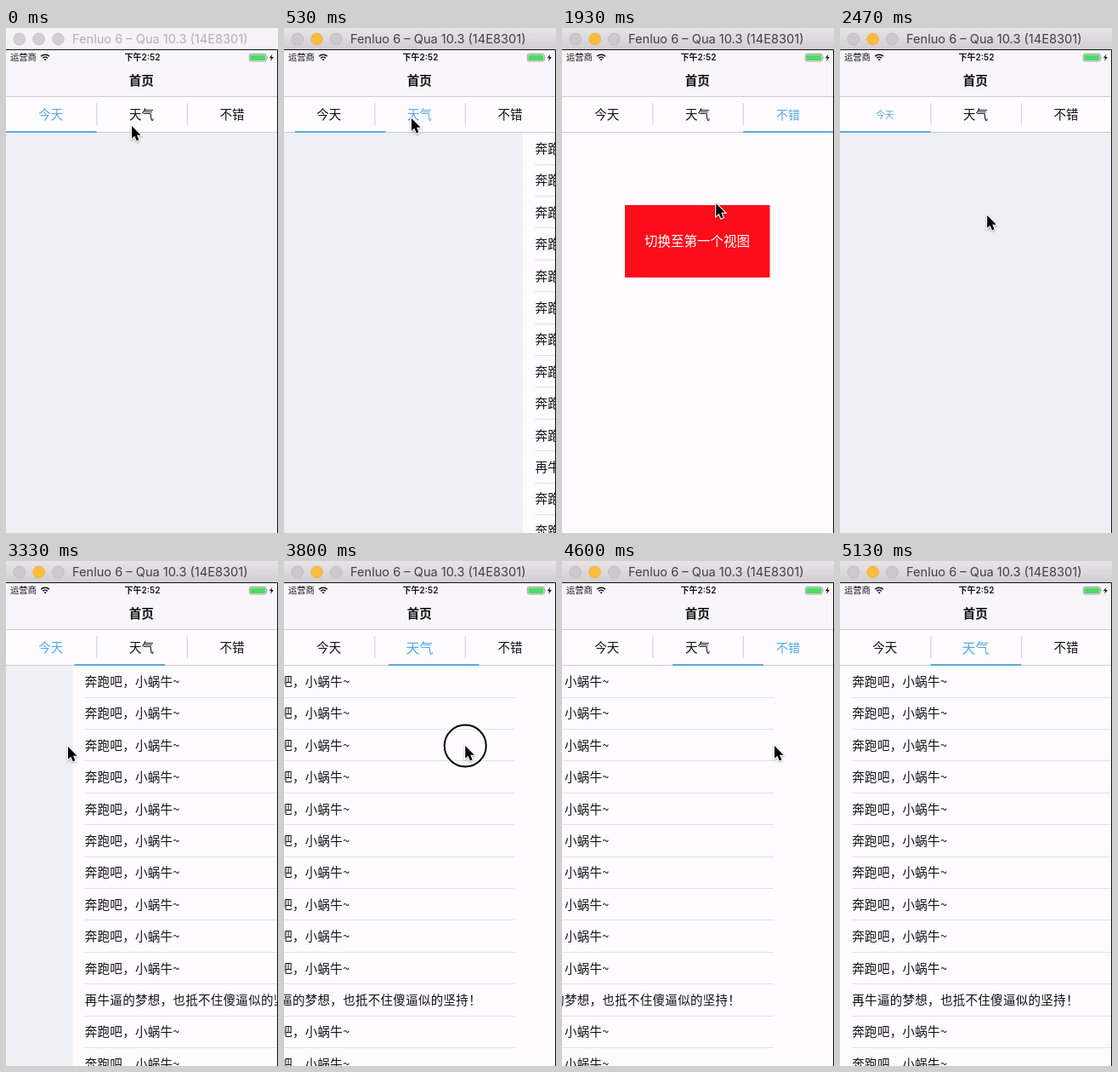
An HTML page for the animation above (5190 ms loop, 320 px wide and 593 px high).

```html
<!DOCTYPE html>
<html lang="zh-CN">
<head>
<meta charset="utf-8">
<title>首页</title>
<style>
  html, body { margin: 0; width: 100%; height: 100%; overflow: hidden; }
  svg { display: block; width: 320px; height: 593px; }
  text { font: 14.5px "Noto Sans CJK SC", "Noto Sans CJK", sans-serif; fill: #111; }
  .mid { text-anchor: middle; }
  .title { font: 14.6px Inter, Roboto, sans-serif; fill: #b2b0b2; }
  .active .title { fill: #404040; }
  .light { fill: #d3d0d3; stroke: #c2bfc2; stroke-width: .8; }
  .active .light { fill: #cbc9cb; stroke: #b9b7b9; }
  .active .min { fill: #fdbc40; stroke: #eab045; }
  #bar { fill: #f6f3f6; }
  .active #bar { fill: url(#chrome); }
  .status { font-size: 10.3px; }
  .time { font: 600 10px Inter, "Noto Sans CJK SC", sans-serif; }
  .nav { font-weight: 700; }
  .tab.on { fill: #55a8e5; }
  .row { letter-spacing: .3px; }
  .action { font-size: 15.5px; fill: #fff; }
  .rule { fill: #e1e0e4; }
  .edge { fill: #cbcacd; }
  .arrow { filter: drop-shadow(0 1px 1px #0005); }
</style>
</head>
<body>
<svg id="stage" viewBox="0 0 320 593">
  <defs>
    <linearGradient id="chrome" x2="0" y2="1">
      <stop stop-color="#e8e5e8"/><stop offset="1" stop-color="#d1ced1"/>
    </linearGradient>
  </defs>

  <rect width="320" height="593" fill="#eff0f6"/>
  <g id="pages">
    <rect x="320" y="122" width="640" height="471" fill="#fefcff"/>
    <g id="rows"></g>
    <rect x="714" y="208" width="170.5" height="85" fill="#fc0d1b"/>
    <text class="action mid" x="799" y="256">切换至第一个视图</text>
  </g>

  <rect y="25" width="320" height="55" fill="#f8f6fa"/>
  <text class="status" x="5" y="38.3">运营商</text>
  <path d="M41.2 33.2a7 7 0 0 1 9.8 0M43.3 35.4a4 4 0 0 1 5.6 0" fill="none" stroke="#111" stroke-width="1.5"/>
  <path d="M46.1 38.6l-1.5-1.7a2.2 2.2 0 0 1 3 0z" fill="#111"/>
  <text class="time mid" x="160.5" y="38.2">下午2:52</text>
  <rect x="286.3" y="30.5" width="20" height="8.5" rx="1.8" fill="none" stroke="#8b8a8e" stroke-width=".8"/>
  <rect x="287.3" y="31.5" width="18" height="6.5" rx=".9" fill="#4cd964"/>
  <path d="M307 33.2q1.2 1.5 0 3z" fill="#8b8a8e"/>
  <path d="M313.4 30.4l-3.6 4.9h2.3l-1 3.7 3.7-5h-2.4z" fill="#111"/>
  <text class="nav mid" x="159.2" y="67.3">首页</text>

  <rect y="80" width="320" height="43" fill="#fefcff"/>
  <rect class="edge" y="80" width="320" height="1"/>
  <rect class="edge" y="122" width="320" height="1"/>
  <rect class="edge" x="106.4" y="88" width="1" height="26"/>
  <rect class="edge" x="212.8" y="88" width="1" height="26"/>
  <g id="tabs"></g>
  <rect id="underline" y="121" width="106.6" height="2" fill="#5baae4"/>

  <rect id="bar" width="320" height="25"/>
  <circle class="light" cx="15.8" cy="13" r="6.9"/>
  <circle class="light min" cx="38.6" cy="13" r="6.9"/>
  <circle class="light" cx="61.4" cy="13" r="6.9"/>
  <text class="title" x="78" y="18.3">Fenluo 6 – Qua 10.3 (14E8301)</text>
  <path d="M0 25.5H319.5V593" fill="none" stroke="#111"/>

  <g id="cursor">
    <g id="ring" fill="none">
      <circle r="24.5" stroke="#fff" stroke-width="3.4"/>
      <circle r="24.5" stroke="#000" stroke-width="2"/>
    </g>
    <path class="arrow" d="M0 0V14.8L3.4 11.7 5.8 17.4 8.4 16.3 6 10.7H10.6Z"
          stroke="#fff" stroke-width="2.2" paint-order="stroke"/>
  </g>
</svg>

<script>
const LOOP = 5190, TICK = 200 / 3, PAGE = 320, TAB = 106.6, PRESS = 80;
const $ = id => document.getElementById(id);

const mix = (a, b, p) => a + (b - a) * p;
const progress = (t, from, length) => Math.min(1, Math.max(0, (t - from) / (length || 1)));
const smooth = p => p * p * (3 - 2 * p);
const settle = p => 1 - (1 - p) ** 2;

// A tap picks its tab at once; a swipe picks it when the glide has ended.
const tap = (at, x, y, to) =>
  ({ at, x, y, to, dx: 0, hold: 0, glide: 300, ease: smooth, pick: at, end: at + 300 });

function swipe(at, x, y, to, dx, hold, glide) {
  const end = at + hold + glide;
  return { at, x, y, to, dx, hold, glide, ease: settle, pick: end, end };
}

// From the resting state to the pointer leaving the stage
const gestures = [
  tap(-3000, 148, 115, 0),
  tap(468, 150, 106, 1),
  tap(1175, 249, 105, 2),
  tap(2140, 172, 220, 0),
  swipe(2930, 268, 218, 1, -195, 341, 300),
  swipe(3750, 262, 217, 2, -188, 150, 180),
  swipe(4220, 74, 217, 1, 176, 260, 400),
  tap(LOOP, 270, 640, 1)
];

function bounce(ms) {
  if (ms < 0) return 1;
  const s = ms / 1000;
  return 1 - .3 * Math.exp(-4.5 * s) * Math.cos(13 * s);
}

function build() {
  for (let i = 0; i < 13; i++) {
    const y = 122.7 + i * 37.4;
    const label = i === 10 ? "再牛逼的梦想，也抵不住傻逼似的坚持！" : "奔跑吧，小蜗牛~";
    $("rows").innerHTML += `<text class="row" x="334.3" y="${y + 24.3}">${label}</text>
      <rect class="rule" x="334" y="${Math.round(y + 36.9)}" width="306" height="1"/>`;
  }
  $("tabs").innerHTML = ["今天", "天气", "不错"]
    .map(name => `<text class="tab mid" y="5.5">${name}</text>`).join("");
}

function drawTabs(t, choice) {
  [...$("tabs").children].forEach((tab, i) => {
    const on = i === choice.to;
    tab.classList.toggle("on", on);
    tab.setAttribute("transform",
      `translate(${52.8 + i * TAB} 101.5) scale(${on ? bounce(t - choice.end) : 1})`);
  });
}

function draw(t) {
  const i = gestures.findLastIndex(g => g.at <= t);
  const now = gestures[i], before = gestures[i - 1] ?? now, next = gestures[i + 1];
  const drag = now.dx * smooth(progress(t, now.at, now.hold));

  const glide = now.ease(progress(t, now.at + now.hold, now.glide));
  const page = mix(before.to - drag / PAGE, now.to, glide);
  $("pages").setAttribute("transform", `translate(${-page * PAGE} 0)`);
  $("underline").setAttribute("x", page * TAB);
  drawTabs(t, t >= now.pick ? now : before);

  const leave = Math.max(0, now.end), press = next.at - PRESS;
  const travel = smooth(progress(t, leave, press - leave));
  const x = mix(now.x + drag, next.x, travel), y = mix(now.y, next.y, travel);
  $("cursor").setAttribute("transform", `translate(${x} ${y})`);
  const down = t < now.at + now.hold || t >= press;
  $("ring").setAttribute("visibility", down ? "visible" : "hidden");

  $("stage").classList.toggle("active", t >= gestures[1].at - PRESS);
}

function frame() {
  const t = performance.now() % LOOP;
  draw(Math.floor((t + 3.4) / TICK) * TICK);
  requestAnimationFrame(frame);
}

build();
frame();
</script>
</body>
</html>
```
